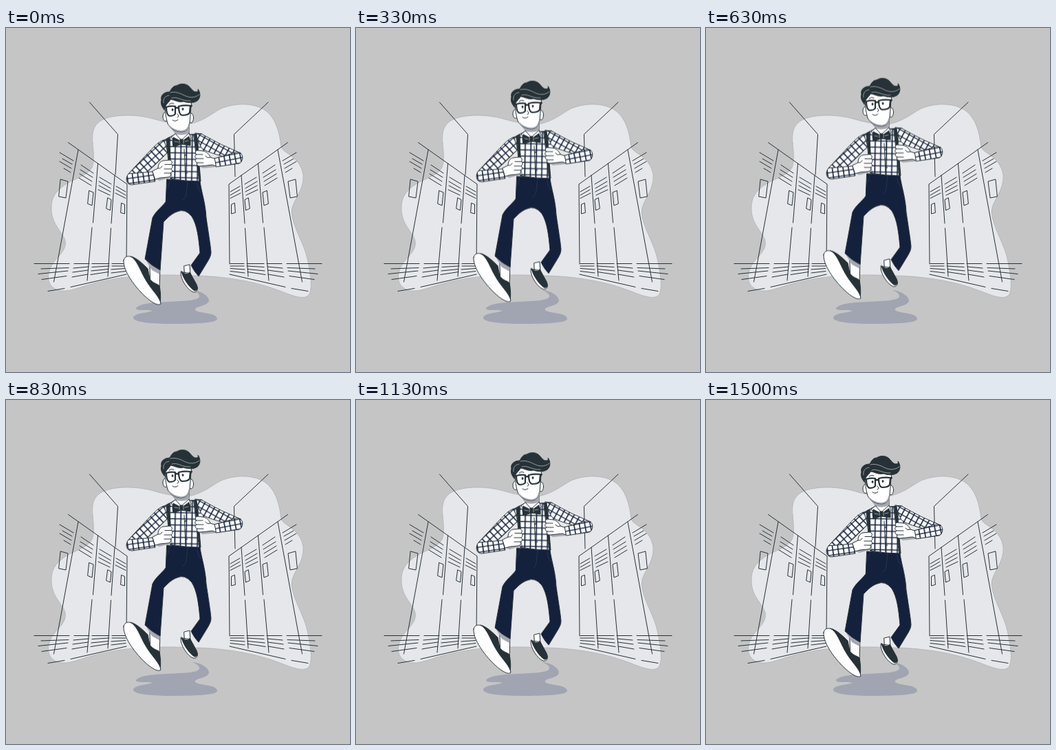
These frames come from a looping animation (500x500 px, 1.54 s). An HTML page without scripts:

```html
<!DOCTYPE html>
<html lang="en">
<head>
<meta charset="utf-8">
<title>Walking down the hallway</title>
<style>
  html, body { margin: 0; width: 100%; height: 100%; overflow: hidden; background: #c5c5c5; }
  svg { display: block; width: 100%; height: 100%; }
  path, ellipse, rect { stroke-linecap: round; stroke-linejoin: round; }
  .line { fill: none; stroke: #263238; stroke-width: 1; }
  .skin { fill: #fff; stroke: #263238; stroke-width: 1; }
  .ink { fill: #263238; stroke: #263238; stroke-width: 1; }
  .navy { fill: #14213d; stroke: #263238; stroke-width: 1; }
  .shade { fill: #a5a8b0; }
  .light { fill: none; stroke: #e6e7ea; stroke-width: .6; }
  .outline { stroke: #263238; stroke-width: 1; }
  .walker { animation: bob 1540ms linear infinite; }
  @keyframes bob {
    0%, 97.4%, 100% { transform: translateY(1px); }
    48.7% { transform: translateY(-9px); }
  }
</style>
</head>
<body>
<svg viewBox="0 0 500 500">
  <defs>
    <pattern id="plaid" width="8.2" height="9" patternUnits="userSpaceOnUse" patternTransform="translate(242 176) rotate(1)">
      <rect width="9" height="9" fill="#fff"/>
      <path d="M4 0V9M0 4.5H9" stroke="#14213d" stroke-width="1.7"/>
    </pattern>
    <pattern id="plaidUpperLeft" href="#plaid" patternTransform="translate(206 190) rotate(-43) scale(.95)"/>
    <pattern id="plaidLowerLeft" href="#plaid" patternTransform="translate(180 214) rotate(-8) scale(.95 .8)"/>
    <pattern id="plaidUpperRight" href="#plaid" patternTransform="translate(290 164) rotate(29) scale(.95 .9)"/>
    <pattern id="plaidLowerRight" href="#plaid" patternTransform="translate(306 191) rotate(-11) scale(.95 .8)"/>

    <g id="lockers" class="line">
      <path d="M90.500 166.500L176 227L175 343M105 177L69.500 369M133.500 197L126.500 283M125 290L118 367M158 214L153 284M152.500 291L148 361"/>
      <path d="M78 181L98 193M82 190L96 198M78 194L95 204M84 204L94 210"/>
      <path d="M109 199L127 211M108 206L126 217M107 212L125 223M106 218L124 229"/>
      <path d="M136 217L153 227M135 223L152 233M135 229L152 238M134 235L151 243"/>
      <path d="M160 230L174 238M160 235L174 243M159 240L174 247.500"/>
      <path d="M79.500 220L90 223L87 247L77 245ZM121 236.500L127 239L125 258L119 255.500ZM148 247L153 249.500L151.500 265L146 262.500ZM168 254.500L172.500 256.500V270L167 268.500Z"/>
      <path d="M41 342.500H92M51 350L91 348.500M47 357.500L90 353M52 365.500L88 360.500M61 382.500L85 378.500"/>
      <path d="M99 342.500H121M98 349L120 347M97 355L119.500 352M96 362L119 358"/>
      <path d="M125 342.500H150M125 347.500L150 346M124 353L149 350.500M123 358.500L149 354.500"/>
      <path d="M154 342.500H174M154 346H174M153 351L174 349.500M153 356L174 353.500M94 376.500L175 358"/>
    </g>
  </defs>

  <rect width="500" height="500" fill="#c5c5c5"/>
  <path fill="#e6e7ea" stroke="#a4a6aa" stroke-width=".6" d="M126 168C124 148 129 137 146 131C166 125 192 126 214 132C231 137 249 141 264 140C284 137 297 126 311 118C330 109 354 109 370 116C390 125 397 147 400 173C403 183 428 186 432 214C433 238 416 250 415 267C417 292 434 312 439 340C442 358 446 374 441 387C434 397 414 388 398 382C360 367 310 360 272 360C214 357 168 360 128 371C104 377 92 385 76 381C60 376 58 360 66 346C73 333 89 324 86 309C82 295 66 286 66 262C66 246 72 238 84 229C98 219 117 216 125 203C129 194 127 178 126 168Z"/>
  <path class="line" d="M121.500 108L162.500 154.500L159 213M381 108L331.500 154.500L333 216"/>
  <use href="#lockers"/>
  <use href="#lockers" transform="translate(500) scale(-1 1)"/>

  <path fill="#a1a5b1" d="M271 381C284 382 295 390 295 396C294 405 273 404 275 410C279 415 307 413 307 423C306 429 274 430 242 430C214 430 185 428 185 421C186 414 207 414 213 411C206 409 188 412 189 407C195 400 216 399 234 398C252 397 283 397 281 389C280 385 275 383 271 381Z"/>

  <g class="walker">
    <g id="rightFoot">
      <path class="skin" d="M259 345L267 343L268 358L260 360Z"/>
      <path class="skin" d="M254 354C253 364 264 380 272 383C277 384 279 380 278 376L268 356Z"/>
      <path class="ink" d="M255 353C257 363 267 377 274 381C279 381 279 377 277 372L267 354C265 358 259 357 255 353Z"/>
    </g>
    <g id="leftFoot">
      <path class="skin" d="M209 338L224 346L223 380L210 370Z"/>
      <path class="shade" d="M204 338L224 350L223 357L212 351Z"/>
      <path class="ink" d="M181 331C190 333 200 343 206 349L209 364C214 371 221 371 223 374C225 384 225 394 224 400L205 383Z"/>
      <path class="skin" d="M171 337C170 350 183 369 195 382C205 393 220 405 225 400C224 391 213 381 206 370C196 355 193 341 184 333C178 329 172 331 171 337Z"/>
    </g>
    <path class="navy" d="M234 219L282 222C284 238 290 253 291 275C294 296 297 313 298 325C298 330 296 333 294 337L280 360Q274 354 269 344L282 326C280 304 278 286 270 273Q260 261 249 266C240 269 234 276 229 281L224 351Q212 345 202 335L213 275C218 265 226 260 232 252Z"/>
    <path fill="none" stroke="#30404f" stroke-width=".7" d="M264 222L262 240Q261 247 257 249M238 221L236 231M278 225Q278 234 284 239"/>

    <path class="outline" fill="url(#plaid)" d="M228 163L245 154H266L285 153L288 177L280 189L282 222Q261 222 239 218L237 185Z"/>
    <path class="outline" fill="url(#plaidUpperLeft)" d="M229 162C221 165 216 171 209 178L178 211L190 223L208 206C216 199 226 189 235 180Z"/>
    <path class="outline" fill="url(#plaidLowerLeft)" d="M178 211C173 217 174 227 183 227L217 222L213 208L190 210Z"/>
    <path class="outline" fill="url(#plaidUpperRight)" d="M275 152L284 153C293 158 304 164 314 169L341 181L337 192L306 183C297 180 289 178 284 173Z"/>
    <path class="outline" fill="url(#plaidLowerRight)" d="M341 181C346 185 344 194 339 196L305 201L302 189L327 182Q334 178 341 181Z"/>

    <path class="ink" d="M233 161L237 158L241 218H239ZM273 154L277 153L283 222H281Z"/>
    <path class="line" stroke-width=".7" d="M259 175L261 220"/>
    <g class="skin">
      <ellipse cx="261" cy="184" rx="1" ry="1"/>
      <ellipse cx="261.500" cy="197" rx="1" ry="1"/>
      <ellipse cx="262" cy="210" rx="1" ry="1"/>
    </g>

    <g id="hands">
      <path class="shade" d="M215 218L223 221L241 216L241 209Z"/>
      <path class="skin" d="M213 207L221 203C221 197 224 193 228 192L238 191C242 192 242 196 240 197C243 199 242 203 240 204C243 206 241 210 239 210C241 213 238 216 235 216L224 217L217 219Z"/>
      <path class="line" stroke-width=".8" d="M231 197.500H240M230 204H240M230 210H239M221 203Q225 204 227 200"/>
      <path class="shade" d="M279 199L286 203L306 201L300 196Z"/>
      <path class="skin" d="M303 189L297 187C295 182 291 179 287 178L278 177C274 178 275 182 277 183C274 184 274 188 277 189C274 191 275 194 278 195C276 198 279 200 282 200L292 199L300 198L305 200Z"/>
      <path class="line" stroke-width=".8" d="M277 183H286M277 189H287M278 195H287M297 187Q292 189 290 185"/>
    </g>

    <path class="skin" d="M246 143L247 157L255 164L266 156V143Z"/>
    <path class="shade" d="M237 141L246 153Q256 157 266 152V142Z"/>
    <path class="skin" d="M246 153L240 158L247 167L255 163L265 167L269 159L266 152L255 162Z"/>
    <path class="ink" d="M255 164L243 158Q241 165 243 172L255 168L268 170Q269 163 266 157Z"/>
    <rect class="ink" x="252" y="161" width="6" height="7" rx="2"/>
    <path class="light" d="M252 162V167M258 162V167M245 164L250 165M260 164L265 163"/>

    <g id="head">
      <ellipse class="skin" cx="232" cy="128" rx="4" ry="6.500"/>
      <ellipse class="skin" cx="269" cy="130" rx="3.500" ry="7"/>
      <path class="skin" d="M232 101C230 115 232 128 235 138C238 145 246 150 255 150C262 150 266 145 267 137L270 102Z"/>
      <path fill="none" stroke="#a5a8b0" stroke-width="1.600" d="M237 141C242 146 248 149 255 149C261 149 265 145 266 139"/>
      <path class="line" d="M249 124Q253 128 249 129M242 133Q246 136 250 132.500M237 110Q240 107 244 109"/>
      <g class="ink">
        <ellipse cx="242" cy="118" rx=".9" ry="1.600"/>
        <ellipse cx="257" cy="117" rx=".9" ry="1.600"/>
      </g>
      <path fill="none" stroke="#263238" stroke-width="2.200" d="M233 114Q240 112 246 113L246 124Q244 127 238 127Q233 126 233 114ZM251 113Q259 111 268 112L267 122Q265 126 256 126Q251 125 251 113ZM246 116Q249 114 251 116M233 115L230 113M268 114L270 112"/>
      <path class="ink" d="M230 118C227 114 224 109 226 104C224 96 231 92 238 92C241 86 244 83 248 83C254 79 262 80 266 84C270 88 272 92 276 92C279 92 280 91 279 88C283 93 283 101 278 105C272 109 264 108 258 106C250 108 244 103 239 103C237 108 232 109 230 118Z"/>
      <path class="light" d="M229 108C228 102 231 98 237 97M239 93C246 91 253 94 259 97C265 100 273 102 281 96M241 101C249 98 256 106 268 105"/>
    </g>
  </g>
</svg>
</body>
</html>
```
